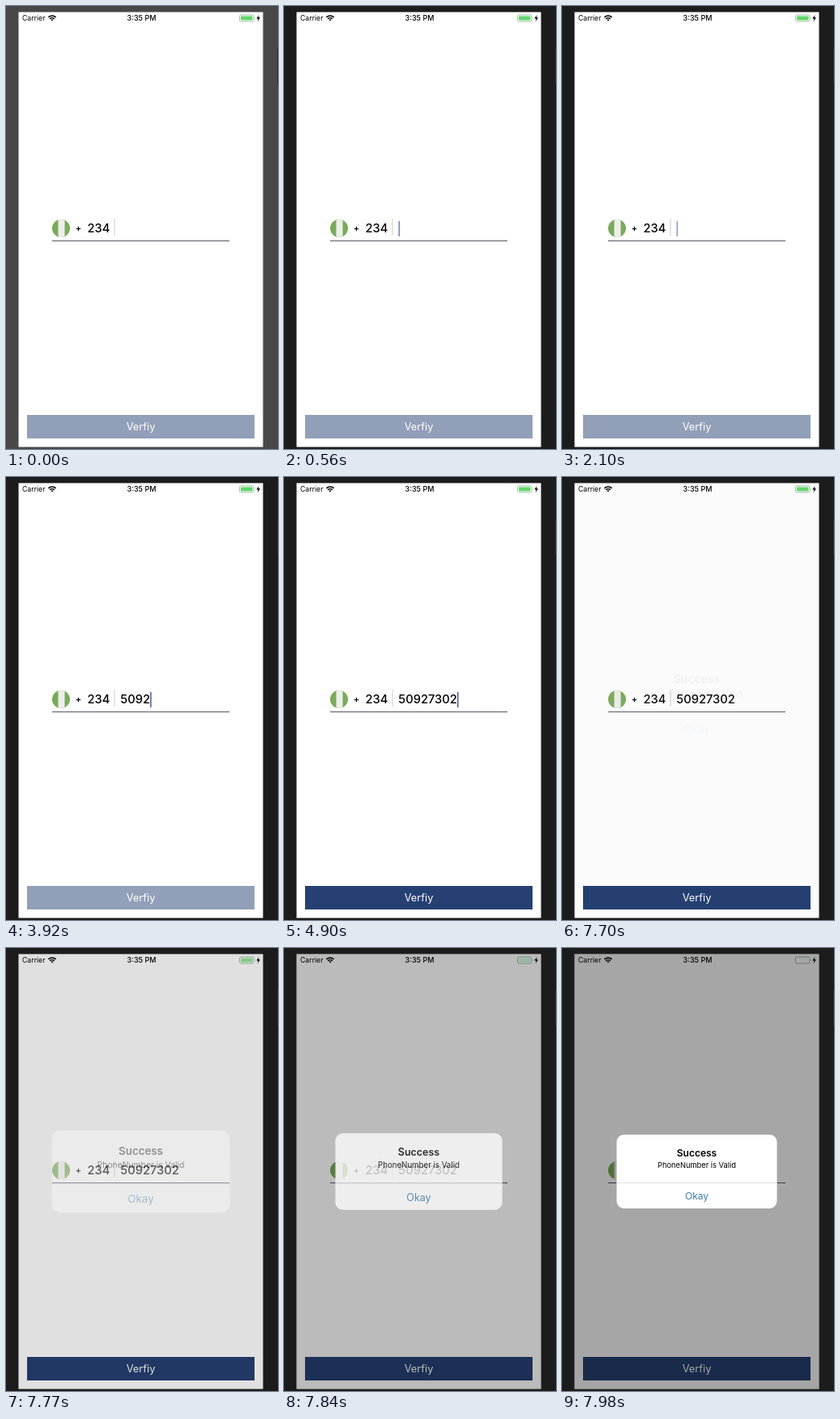
Animation of 336 by 546 pixels, one loop 8 s. Source, as an HTML page:

```html
<!DOCTYPE html>
<html lang="en">
<head>
<meta charset="utf-8">
<title>Phone number check</title>
<style>
  html, body { margin: 0; width: 100%; height: 100%; overflow: hidden; }
  svg { display: block; font-family: Inter, Roboto, sans-serif; }
  .mid { text-anchor: middle; }
  .bold { font-weight: 600; }
  .digits { font-size: 14.7px; font-weight: 550; }
  #alert { transform-origin: 166.5px 275.5px; }
</style>
</head>
<body>
<svg width="336" height="546" viewBox="0 0 336 546">
  <defs><clipPath id="round"><circle cx="68" cy="274" r="11"/></clipPath></defs>
  <rect id="bezel" width="336" height="546"/>
  <rect x="335" y="52" width="1" height="44" fill="#2c2c2c"/>
  <rect x="15.5" y="7.5" width="302" height="536" fill="#fff"/>

  <!-- status bar -->
  <text x="20" y="18.3" font-size="8.7">Carrier</text>
  <g fill="none" stroke="#000" stroke-width="1.5">
    <path d="M52.4 13.9A6.5 6.5 0 0 1 61.6 13.9M54.2 15.9A4 4 0 0 1 59.8 15.9"/>
    <path d="M57 18.6l-1.5-1.6a2.2 2.2 0 0 1 3 0z" fill="#000" stroke="none"/>
  </g>
  <text class="mid" x="167.5" y="18.3" font-size="9" font-weight="500">3:35 PM</text>
  <rect x="288.5" y="11" width="17.5" height="8" rx="2" fill="none" stroke="#9ac79d"/>
  <rect id="charge" x="290" y="12.5" width="14.5" height="5" rx="1" fill="#62d66b"/>
  <path d="M307 13.5q1.2 1.5 0 3z" fill="#9ac79d"/>
  <path d="M312.5 11l-3.2 4.6h2.2l-.9 3.7 3.4-5h-2.2z"/>

  <!-- phone field -->
  <g clip-path="url(#round)">
    <rect x="57" y="263" width="22" height="22" fill="#78ac57"/>
    <rect x="64.5" y="263" width="8" height="22" fill="#eee"/>
  </g>
  <text class="bold" x="85.7" y="278.3" font-size="11">+</text>
  <text class="digits" x="100.5" y="279.3">234</text>
  <rect x="133.5" y="262" width="1" height="21" fill="#ccc"/>
  <text class="digits" id="number" x="141.3" y="279.3"></text>
  <rect id="caret" y="265" width="1.5" height="19" fill="#4a5aa8"/>
  <rect x="57" y="289" width="219" height="1" fill="#5a5660"/>

  <rect id="button" x="26" y="504" width="281" height="29" fill="#264073"/>
  <text class="mid" x="166.5" y="523" font-size="12.8" fill="#fff">Verfiy</text>

  <rect id="dim" x="15.5" y="7.5" width="302" height="536"/>
  <g id="alert" class="mid">
    <rect x="67.5" y="230" width="198" height="91" rx="9" fill="#fff"/>
    <text class="bold" x="166.5" y="256.8" font-size="12">Success</text>
    <text x="166.5" y="271.4" font-size="9.3">PhoneNumber is Valid</text>
    <rect x="67.5" y="289" width="198" height="1" fill="#e4e4e6"/>
    <text x="166.5" y="310.3" font-size="12" fill="#3f7fae">Okay</text>
  </g>
</svg>
<script>
const LOOP = 8000, STEP = 70, BLINK = 1040;
const FOCUS = 140, ACTIVE = 560, SUBMIT = 7560, ALERT = 7670;
const PHONE = "50927302";
const KEYS = [2380, 2590, 3710, 3920, 4200, 4410, 4620, 4900];

const el = id => document.getElementById(id);
const clamp = x => Math.min(1, Math.max(0, x));
const smooth = x => x * x * (3 - 2 * x);

// The blink restarts with every key, fading in and out
function caretOpacity(t, lastKey) {
  if (t < FOCUS || t >= SUBMIT) return 0;
  const age = t - lastKey;
  if (age < BLINK / 2) return 1;
  const fromMiddle = Math.abs((age + 180) % BLINK - BLINK / 2);
  return clamp((360 - fromMiddle) / 130);
}

function draw(now) {
  const t = Math.floor(now % LOOP / STEP) * STEP;
  const typed = KEYS.filter(k => k <= t).length;
  const shown = smooth(clamp((t - ALERT) / 250));
  const number = el("number");
  number.textContent = PHONE.slice(0, typed);
  const end = typed ? number.getComputedTextLength() : 0;

  el("bezel").style.fill = t < ACTIVE ? "#484848" : "#1c1c1c";
  el("caret").setAttribute("x", 141.5 + end);
  el("caret").style.opacity = caretOpacity(t, KEYS[typed - 1] ?? -40);
  el("button").style.opacity = typed < 5 ? .5 : 1;
  el("charge").style.opacity = 1 - shown;
  el("dim").style.opacity = .35 * shown;
  el("alert").style.opacity = shown;
  el("alert").style.transform = `scale(${1.17 - .17 * shown})`;
  requestAnimationFrame(() => draw(performance.now() - start));
}

const start = performance.now();
draw(0);
</script>
</body>
</html>
```
